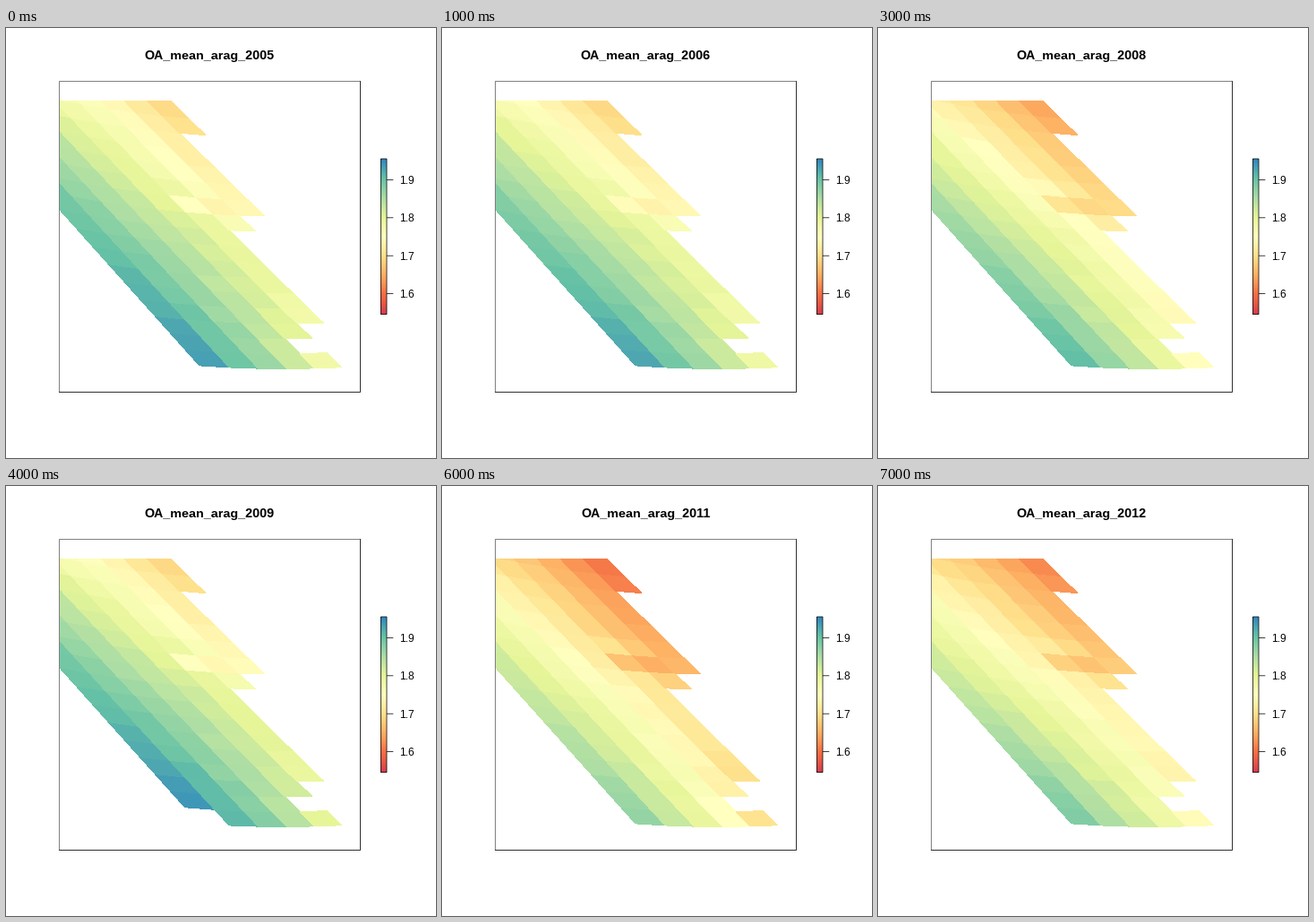
Write a matplotlib script that moves like this. It is 480x480 px and loops after 8000 ms.

```python
import numpy as np
import matplotlib.pyplot as plt
from matplotlib.animation import FuncAnimation
from matplotlib.collections import PolyCollection
from matplotlib.colors import LinearSegmentedColormap, Normalize
from matplotlib.patches import Rectangle

SIZE, DPI = 480, 72
FIRST_YEAR, YEARS = 2005, 8
LOW, HIGH = 1.545, 1.955

SPECTRAL = LinearSegmentedColormap.from_list("spectral", [
    "#D53E4F", "#F46D43", "#FDAE61", "#FEE08B", "#FFFFBF",
    "#E6F598", "#ABDDA4", "#66C2A5", "#3288BD"], N=255)
NORM = Normalize(LOW, HIGH)

# One value per year, in thousandths: south-west level above 1,
# fall per column (offshore to coast) and fall per row (northward)
LEVEL = [935, 928, 865, 907, 948, 855, 870, 885]
ACROSS = [21, 19.5, 23, 21.5, 20, 26, 22.5, 19]
ALONG = [4.5, 5, 5.5, 5.7, 6, 3.7, 5.3, 7]


def corner(col, row):
    """Pixel position of a grid corner on the tilted, curved grid."""
    base = 380.4 - 16.75 * row - 0.029 * row ** 2
    y = base
    for _ in range(6):
        t = y - 230
        step = 28.15 + 0.0183 * t + 0.0000215 * t ** 2
        x = 84.3 + 0.897 * t + col * step
        y = base - 0.0004 * (x - 310) ** 2
    return x, y


def columns_in(row):
    """Number of columns from the open sea to the stepped coast."""
    if row < 3:
        return 4 if row == 1 else 5
    return 6 + (row >= 9) + (row >= 10) + (row >= 15)


CELLS = [(c, r) for r in range(18) for c in range(columns_in(r))]
SHAPES = [[corner(c, r), corner(c + 1, r), corner(c + 1, r + 1), corner(c, r + 1)]
          for c, r in CELLS]
COL, ROW = np.array(CELLS, float).T
JITTER = np.random.default_rng(4).normal(0, 2.5, len(CELLS))

# The fall across is steeper in the south; two local lows: a bay and the north-west
STEEPNESS = 1 + 0.8 * np.clip(1 - ROW / 9, 0, 1) ** 2
BAY = 45 * np.exp(-(COL - 5.4) ** 2 - 4 * (ROW - 10) ** 2)
NORTH_WEST = 6 * np.clip(ROW - 14, 0, 3) * np.clip(5 - COL, 0, 2)


def cell_colors(i):
    value = LEVEL[i] - ACROSS[i] * COL * STEEPNESS - ALONG[i] * ROW
    value += JITTER - BAY - NORTH_WEST
    colors = SPECTRAL(NORM(np.clip(1 + value / 1000, LOW, HIGH)))
    if FIRST_YEAR + i == 2009:
        colors[0, 3] = 0  # no data in the south-west corner
    return colors


plt.rcParams["font.family"] = "Liberation Sans"
plt.rcParams["text.hinting"] = "default"
fig = plt.figure(figsize=(SIZE / DPI, SIZE / DPI), dpi=DPI, facecolor="white")
ax = fig.add_axes([0, 0, 1, 1])
ax.axis("off")

grid = PolyCollection(SHAPES, edgecolors="none", antialiaseds=False)
ax.add_collection(grid)
grid.set_clip_path(Rectangle((59, 81), 337, 326, transform=ax.transData))


def line(xs, ys, color="black", lw=1):
    ax.plot(xs, ys, color=color, lw=lw, snap=False, zorder=3,
            solid_capstyle="butt", solid_joinstyle="miter")


# Map frame: soft left and top edges, crisp right and bottom edges
line([59.5, 59.5, 396], [407, 59.5, 59.5], color="#808080")
line([59, 395.5, 395.5], [406.5, 406.5, 59], color="#303030")

ramp = np.linspace(HIGH, LOW, 174)[:, None]
ax.imshow(ramp, cmap=SPECTRAL, norm=NORM, aspect="auto",
          extent=(418.3, 425, 319.6, 146), interpolation="nearest")
line([418.4, 425, 425, 418.4, 418.4], [146, 146, 319.6, 319.6, 146], lw=0.75)

for value in (1.6, 1.7, 1.8, 1.9):
    y = 169.4 + (1.9 - value) * 424
    line([425, 432.3], [y, y], lw=0.75)
    ax.text(439.2, y + 4.4, f"{value:.1f}", fontsize=12, va="baseline")

title = ax.text(227.4, 35, "", fontsize=14.4, weight="bold",
                ha="center", va="baseline")
ax.set_xlim(0, SIZE)
ax.set_ylim(SIZE, 0)


def update(i):
    grid.set_facecolor(cell_colors(i))
    title.set_text(f"OA_mean_arag_{FIRST_YEAR + i}")
    return grid, title


anim = FuncAnimation(fig, update, frames=YEARS, interval=1000,
                     repeat=True, repeat_delay=0)
plt.show()
```
